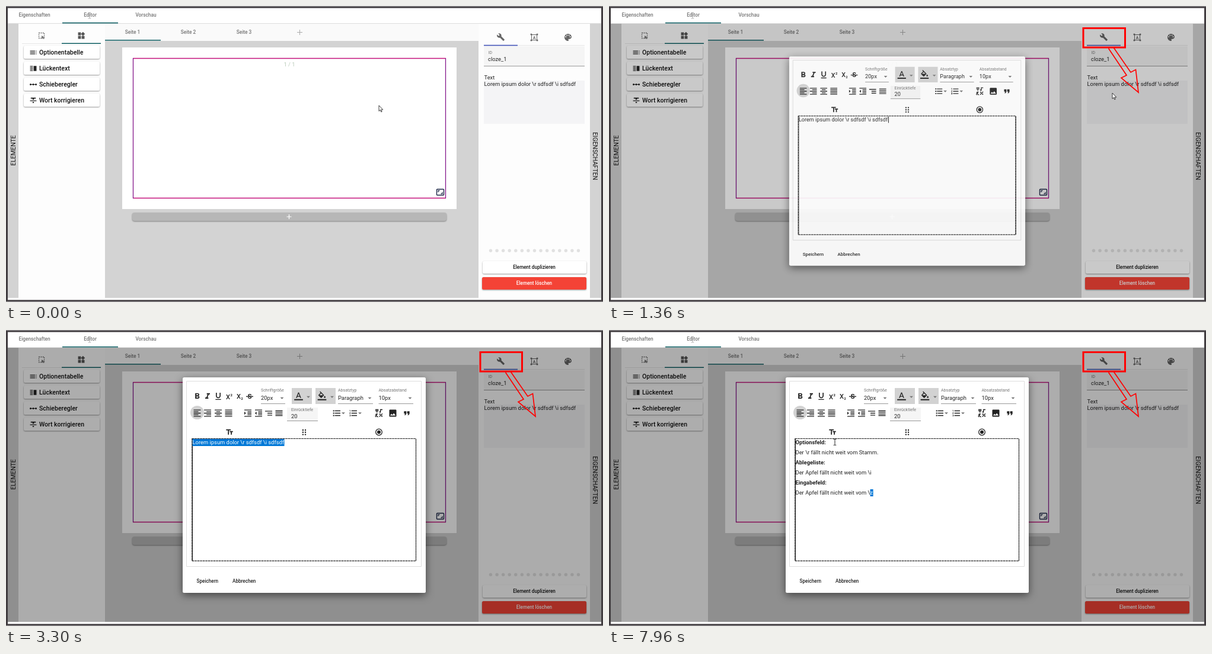
Animation, 1007 px wide and 500 px high, one loop 8000 ms. Source, as an HTML page:

```html
<!DOCTYPE html>
<html lang="de">
<head>
<meta charset="utf-8">
<title>Lückentext-Editor</title>
<style>
  html, body { margin: 0; height: 100%; overflow: hidden; background: #fff; }
  svg { display: block; font-family: Roboto, sans-serif; }
  .raised { filter: drop-shadow(0 1px 1px #0006); }
  #dialog { transform-origin: 503px 262px; }
  #panel { filter: drop-shadow(0 4px 7px #0008); }
</style>
</head>
<body>
<svg id="stage" width="1007" height="500" viewBox="0 0 1007 500"></svg>
<script>
const GREY = '#757575', DARK = '#222', TEAL = '#0b5c61', FONT = 9.4;

const rect = (x, y, w, h, fill, extra = '') =>
  `<rect x="${x}" y="${y}" width="${w}" height="${h}" fill="${fill}" ${extra}/>`;
const text = (x, y, str, size = FONT, extra = '') =>
  `<text x="${x}" y="${y}" font-size="${size}" ${extra}>${str}</text>`;
const label = (x, y, str, size, fill, weight = 500) =>
  text(x, y, str, size, `text-anchor="middle" font-weight="${weight}" fill="${fill}"`);
const icon = (d, x, y, size = 16, fill = DARK) =>
  `<path d="${d}" fill="${fill}" transform="translate(${x - size / 2} ${y - size / 2}) scale(${size / 24})"/>`;
const line = (d, stroke, width = 1, extra = '') =>
  `<path d="${d}" fill="none" stroke="${stroke}" stroke-width="${width}" ${extra}/>`;
const dot = (x, y, r, fill) => `<circle cx="${x}" cy="${y}" r="${r}" fill="${fill}"/>`;
const alignPath = (x, w) => [3, 7, 11, 15, 19].map((y, i) =>
  i % 2 ? `M${x} ${y}h${w}v2h${-w}z` : `M3 ${y}h18v2H3z`).join('');

const ICONS = {
  toc: 'M3 9h14V7H3zm0 4h14v-2H3zm0 4h14v-2H3zm16 0h2v-2h-2zm0-10v2h2V7zm0 6h2v-2h-2z',
  split: 'M3 15h8v-2H3zm0 4h8v-2H3zm0-8h8V9H3zm0-6v2h8V5zm10 0h8v14h-8z',
  scale: 'M4 11h16v2H4zM2 12a2.5 2.5 0 0 1 5 0 2.5 2.5 0 0 1-5 0zM9.5 12a2.5 2.5 0 0 1 5 0 2.5 2.5 0 0 1-5 0zM17 12a2.5 2.5 0 0 1 5 0 2.5 2.5 0 0 1-5 0z',
  strike: 'M10 19h4v-3h-4zM5 4v3h5v3h4V7h5V4zM3 14h18v-2H3z',
  widgets: 'M13 13v8h8v-8zM3 21h8v-8H3zM3 3v8h8V3zm13.66-1.31L11 7.34 16.66 13l5.66-5.66z',
  wrench: 'M22.7 19l-9.1-9.1c.9-2.3.4-5-1.5-6.9-2-2-5-2.4-7.4-1.3L9 6 6 9 1.6 4.7C.4 7.1.9 10.1 2.9 12.1c1.9 1.9 4.6 2.4 6.9 1.5l9.1 9.1c.4.4 1 .4 1.4 0l2.3-2.3c.5-.4.5-1.1.1-1.4z',
  palette: 'M12 3c-4.97 0-9 4.03-9 9s4.03 9 9 9c.83 0 1.5-.67 1.5-1.5 0-.39-.15-.74-.39-1.01-.23-.26-.38-.61-.38-.99 0-.83.67-1.5 1.5-1.5H16c2.76 0 5-2.24 5-5 0-4.42-4.03-8-9-8z',
  bold: 'M15.6 10.79c.97-.67 1.65-1.77 1.65-2.79 0-2.26-1.75-4-4-4H7v14h7.04c2.09 0 3.71-1.7 3.71-3.79 0-1.52-.86-2.82-2.15-3.42zM10 6.5h3c.83 0 1.5.67 1.5 1.5s-.67 1.5-1.5 1.5h-3zm3.5 9H10v-3h3.5c.83 0 1.5.67 1.5 1.5s-.67 1.5-1.5 1.5z',
  italic: 'M10 4v3h2.21l-3.42 8H6v3h8v-3h-2.21l3.42-8H18V4z',
  underline: 'M12 17c3.31 0 6-2.69 6-6V3h-2.5v8c0 1.93-1.57 3.5-3.5 3.5S8.5 12.93 8.5 11V3H6v8c0 3.31 2.69 6 6 6zm-7 2v2h14v-2z',
  color: 'M11 3L5.5 17h2.25l1.12-3h6.25l1.12 3h2.25L13 3zm-1.38 9L12 5.67 14.38 12zM1 20h22v3H1z',
  fill: 'M16.56 8.94L7.62 0 6.21 1.41l2.38 2.38-5.15 5.15c-.59.59-.59 1.54 0 2.12l5.5 5.5c.29.29.68.44 1.06.44s.77-.15 1.06-.44l5.5-5.5c.59-.58.59-1.53 0-2.12zM5.21 10L10 5.21 14.79 10zM19 11.5s-2 2.17-2 3.5a2 2 0 0 0 4 0c0-1.33-2-3.5-2-3.5zM1 20h22v3H1z',
  left: alignPath(3, 12), right: alignPath(9, 12), center: alignPath(7, 10), justify: alignPath(3, 18),
  indent: 'M3 21h18v-2H3zM3 8v8l4-4zm8 9h10v-2H11zM3 3v2h18V3zm8 6h10V7H11zm0 4h10v-2H11z',
  outdent: 'M3 21h18v-2H3zM7 8v8l-4-4zm4 9h10v-2H11zM3 3v2h18V3zm8 6h10V7H11zm0 4h10v-2H11z',
  segment: 'M9 18h12v-2H9zM3 6v2h18V6zm6 7h12v-2H9z',
  reorder: 'M3 15h18v-2H3zm0 4h18v-2H3zm0-8h18V9H3zm0-6v2h18V5z',
  bullets: 'M2.5 4.5h3v3h-3zm0 6h3v3h-3zm0 6h3v3h-3zM7 5v2h14V5zm0 6v2h14v-2zm0 6v2h14v-2z',
  numbers: 'M2 17h2v.5H3v1h1v.5H2v1h3v-4H2zm1-9h1V4H2v1h1zm-1 3h1.8L2 13.1v.9h3v-1H3.2L5 10.9V10H2zm5-6v2h14V5zm0 14h14v-2H7zm0-6h14v-2H7z',
  symbols: 'M3 2h8v2H3zM3 5h8v2H8v4H6V7H3zM12.4 20.2l7.8-7.8 1.4 1.4-7.8 7.8zM13 13h3v3h-3zM18 18h3v3h-3zM15 2h6v2h-4v5a2 2 0 1 1-2-2zM5 13h4v2L6 17l5 5H8l-3-3-1 1 2 2H4l-2-2 2-3-1-2z',
  image: 'M21 19V5c0-1.1-.9-2-2-2H5c-1.1 0-2 .9-2 2v14c0 1.1.9 2 2 2h14c1.1 0 2-.9 2-2zM8.5 13.5l2.5 3.01L14.5 12l4.5 6H5z',
  quote: 'M6 17h3l2-4V7H5v6h3zm8 0h3l2-4V7h-6v6h3z',
  textSize: 'M2.5 4v3h5v12h3V7h5V4zm19 5h-9v3h3v7h3v-7h3V9z',
  caret: 'M7 10l5 5 5-5z'
};

const row = (names, xs, y) => names.split(' ').map((n, i) => icon(ICONS[n], xs[i], y)).join('');

function leftPanel() {
  const items = [['toc', 'Optionentabelle'], ['split', 'Lückentext'], ['scale', 'Schieberegler'], ['strike', 'Wort korrigieren']];
  return rect(21, 30, 146, 463, '#fdfdfd') + line('M27 63.5H160', '#e6e6e6') + rect(94, 62.5, 66, 1.5, TEAL) +
    line('M55.5 45.5h9v9h-9z', GREY, 1.3, 'stroke-dasharray="2 1.2"') + icon('M12 12v9l3-3 3 4 2-1-3-4h4z', 60, 50, 14, GREY) +
    icon(ICONS.widgets, 127, 50, 14.5, '#555') +
    items.map(([name, str], i) => {
      const y = 67 + 27 * i;
      return rect(30, y, 128, 22, '#fff', 'rx="2.5" class="raised"') + icon(ICONS[name], 46, y + 11.5, 14.5) +
        text(56, y + 14.6, str, 10.5, 'font-weight="500" fill="#111"');
    }).join('');
}

function pageArea() {
  return rect(167, 30, 630, 29, '#fafafa') + rect(167, 57, 94, 1.5, TEAL) +
    [1, 2, 3].map(n => label(119.5 + 94 * n, 47, 'Seite ' + n, 8.3, GREY)).join('') +
    line('M491 44.5h9M495.5 40v9', '#aaa') +
    rect(196, 70, 564, 273, '#fff') +
    line('M214 88.5H742M214 324.5H742', '#c4127c', 1.3) + line('M214.5 88V325M741.5 88V325', '#84168a', 1.3) +
    label(478, 101.5, '1 / 1', FONT, '#b9cbb9', 400) +
    line('M727.5 309.5h10a1 1 0 0 1 1 1v8a1 1 0 0 1-1 1h-10a1 1 0 0 1-1-1v-8a1 1 0 0 1 1-1z', '#1b2546', 1.4) +
    line('M729 314.5v-2.6h2.6M736 314.5v2.6h-2.6', '#1b2546', 1.3) +
    rect(213, 349, 530, 14, '#b7b7b7', 'rx="4" class="raised"') + line('M473.5 356h8M477.5 352v8', '#fff', 1.2);
}

function rightPanel() {
  const dots = Array.from({ length: 15 }, (_, i) => dot(817.5 + 10.57 * i, 413.3, 2.7, '#e1e1e1')).join('');
  const holes = [[944.2, 52], [946.3, 49.4], [949.6, 49.4], [951.6, 52]].map(([x, y]) => dot(x, y, 1, '#fdfdfd')).join('');
  return rect(797, 30, 188, 463, '#fdfdfd') + line('M806 66.5H976', '#e6e6e6') + rect(806, 65.7, 57, 1.6, '#3f51b5') +
    icon(ICONS.wrench, 834.5, 52.5, 14, '#666') + icon(ICONS.palette, 948, 53, 16, '#666') + holes +
    line('M886.5 48.5h9v9h-9z', '#666') + label(891, 56, 'A', 7, '#666', 700) +
    [[886, 48], [896, 48], [886, 58], [896, 58]].map(([x, y]) => rect(x - 1.3, y - 1.3, 2.6, 2.6, '#666')).join('') +
    rect(806, 68, 170, 34, '#f5f5f5') + line('M806 101.5H976', '#999') +
    text(813.5, 81, 'ID', 7, `fill="${GREY}"`) + text(813, 92.7, 'cloze_1') + text(806.5, 124, 'Text') +
    rect(806, 126, 170, 73, '#f4f4f6') + text(806.5, 135, 'Lorem ipsum dolor \\r sdfsdf \\i sdfsdf') + dots +
    rect(804, 431, 175, 21, '#fff', 'rx="2.5" class="raised"') + label(891, 444.3, 'Element duplizieren', 8.15, '#111') +
    rect(803, 458, 176, 21, '#f44336', 'rx="2.5" class="raised"') + label(891, 471.2, 'Element löschen', 8.15, '#fff');
}

function toolbar() {
  const select = (x, end, name, value) => text(x, 104, name, 7.05, `fill="${GREY}"`) + text(x, 118.3, value) +
    line(`M${x} 124.5H${end}`, '#999') + icon(ICONS.caret, end - 5.5, 115, 14, GREY);
  return row('bold italic underline', [322.5, 340, 358], 112) +
    text(371, 116.5, 'X', 11, 'font-weight="500"') + text(378.5, 112, '2', 6, 'font-weight="700"') +
    text(389, 116, 'X', 11, 'font-weight="500"') + text(396.5, 118, '2', 5.5, 'font-weight="700"') +
    label(411, 116.3, 'S', 11.5, DARK, 700) + line('M405 112.3h12', DARK, 1.3) +
    select(430, 471, 'Schriftgröße', '20px') + select(560, 619, 'Absatztyp', 'Paragraph') + select(628.5, 687, 'Absatzabstand', '10px') +
    rect(482, 98, 34, 27, '#d2d2d2') + rect(522, 98, 34, 27, '#d2d2d2') + row('color fill', [493.5, 533], 111.5) +
    [[510, 113], [550, 113], [569, 140.5], [597, 140.5]].map(([x, y]) => icon(ICONS.caret, x, y, 14, GREY)).join('') +
    dot(322.5, 139.5, 11.5, '#d2d2d2') +
    row('left right center justify indent outdent segment reorder', [322.5, 340, 358, 375.5, 408, 426, 443, 460.5], 140.5) +
    rect(474, 131, 52, 23, '#f5f5f5') + line('M474 153.5h52', '#999') +
    text(481, 137, 'Einrücktiefe', 7.05, `fill="${GREY}"`) + text(481, 148.8, '20') +
    row('bullets numbers symbols image quote', [558, 586, 629, 652.5, 676], 140.5) +
    icon(ICONS.textSize, 377, 172.5, 14.5) +
    [500.9, 505].map(x => [169, 172.8, 176.6].map(y => dot(x, y, 1.2, DARK)).join('')).join('') +
    dot(629, 172.5, 3, DARK) + '<circle cx="629" cy="172.5" r="5.3" fill="none" stroke="#222" stroke-width="1.3"/>';
}

const STORY = ['Optionsfeld:', 'Der \\r fällt nicht weit vom Stamm.', 'Ablegeliste:', 'Der Apfel fällt nicht weit vom \\i',
  'Eingabefeld:', 'Der Apfel fällt nicht weit vom \\z'];

const dialog = () => '<g id="dialog">' + rect(298, 80, 410, 364, '#fff', 'rx="2.5" id="panel"') +
  line('M304.5 86.5H700.5V399.5H304.5z', '#ddd') + toolbar() +
  line('M313.5 183.5H691.5V390H313.5z', '#888') +
  line('M314 183.5H691.5V390H314z', DARK, 1.1, 'stroke-dasharray="3 1.5"') + line('M314.5 184V390M691.5 184V390', DARK) +
  '<g id="doc">' + text(314.5, 193.3, 'Lorem ipsum dolor \\r sdfsdf \\i sdfsdf', FONT, 'id="lorem"') + '<g id="story">' +
  STORY.map((s, i) => text(314.5, 193.3 + 17 * i, s, FONT, i % 2 ? '' : 'font-weight="700"')).join('') + '</g></g>' +
  '<g clip-path="url(#selected)">' + rect(314, 183, 378, 207, '#0078d7') + '<use href="#doc" fill="#fff"/></g>' +
  rect(0, 0, 1, 11, '#111', 'id="textCaret"') +
  label(339.8, 426.5, 'Speichern', 8.15, DARK) + label(401.7, 426.5, 'Abbrechen', 8.15, DARK) + '</g>';

const vertical = (x, y, angle, str) =>
  `<g transform="translate(${x} ${y}) rotate(${angle})">${label(0, 3.7, str, 10.3, '#111', 400)}</g>`;
const iBeam = 'M-2.2 -5H-.5L0 -4.5L.5 -5H2.2M0 -4.5V4.5M-2.2 5H-.5L0 4.5L.5 5H2.2';

stage.innerHTML = `<clipPath id="selected">${rect(0, 0, 0, 12, '#000', 'id="selection"')}</clipPath>` +
  `<g fill="${DARK}">` + rect(0, 0, 1007, 500, '#fff') +
  ['Eigenschaften', 'Editor', 'Vorschau'].map((s, i) => label(48 + 94 * i, 18, s, 8.3, GREY)).join('') +
  line(iBeam, '#aaa', 1, 'transform="translate(141 16)"') +
  line('M3 29.5H1004', '#ddd') + rect(95, 27.8, 94, 1.6, TEAL) +
  rect(3, 30, 1001, 463, '#d3d3d3') + leftPanel() + pageArea() + rightPanel() +
  vertical(12, 244, -90, 'ELEMENTE') + vertical(994, 253.5, 90, 'EIGENSCHAFTEN') +
  rect(3, 30, 1001, 463, '#000', 'id="backdrop"') + dialog() +
  '<g id="note">' + line('M800 37.5h70.5v32.5H800z', '#f00', 3) +
  line('M842.5 71.5L873 117L864 121.5L893 146L888.5 107.5L880 112L851 70', '#f00', 1.7) + '</g>' +
  line('M1.5 2H1005.5V498H1.5z', '#413d40', 3) +
  '<g id="mouse"><path id="arrow" d="M0 0v9.6l2.2-2 1.6 3.4 1.4-.6-1.5-3.3h3.1z" fill="#fff" stroke="#111" stroke-width=".8"/>' +
  line(iBeam, DARK, 1, 'id="beam"') + '</g></g>';

const MOUSE = [[0, 629, 168], [130, 629, 168], [330, 720, 190], [550, 830, 175], [730, 849, 147], [1400, 849, 147],
  [1700, 466, 203], [1900, 330, 195], [2000, 316, 189.5], [2530, 316, 189.5], [3030, 486, 197], [4030, 486, 197],
  [4100, 502, 240], [4330, 502, 240], [4830, 367.5, 222], [5100, 344, 215], [5300, 338, 207], [5790, 338, 207],
  [5860, 409.5, 237], [6150, 441, 241], [6630, 441, 241], [6930, 443, 277], [7330, 443, 277], [7400, 457, 287],
  [7660, 457, 287], [7960, 381, 189.5], [8000, 381, 189.5]];
// start, end, x, text row
const CARETS = [[1221, 2260, 470, 0], [2260, 2530, 314.5, 0], [4030, 5430, 445.5, 5], [5430, 5630, 337, 1],
  [6450, 6600, 441, 3], [7130, 7330, 441, 5]];
// start, end, x, width, text row
const SELECTIONS = [[2530, 4030, 314.5, 155, 0], [5630, 6450, 335, 5.6, 1], [6600, 7130, 440.6, 2.5, 3], [7330, 8000, 440.6, 5, 5]];

const clamp = v => Math.min(1, Math.max(0, v));
const during = t => ([start, end]) => t >= start && t < end;
const show = (el, on) => el.setAttribute('display', on ? 'inline' : 'none');
const setAll = (el, attrs) => Object.entries(attrs).forEach(([k, v]) => el.setAttribute(k, v));
const $ = id => document.getElementById(id);

function bezier(x, x1, y1, x2, y2) {
  const at = (s, a, b) => 3 * s * (1 - s) * ((1 - s) * a + s * b) + s ** 3;
  let lo = 0, hi = 1;
  for (let i = 0; i < 20; i++) {
    const mid = (lo + hi) / 2;
    if (at(mid, x1, x2) < x) lo = mid; else hi = mid;
  }
  return at(hi, y1, y2);
}

function mouseAt(t) {
  const i = Math.max(1, MOUSE.findIndex(k => k[0] > t));
  const [t0, x0, y0] = MOUSE[i - 1], [t1, x1, y1] = MOUSE[i];
  const p = (t - t0) / (t1 - t0);
  return [x0 + (x1 - x0) * p, y0 + (y1 - y0) * p];
}

function draw(t) {
  const opening = bezier(clamp((t - 1221) / 232), 0, 0, .2, 1);
  show($('dialog'), t >= 1221);
  $('dialog').style.opacity = opening;
  $('dialog').style.transform = `scale(${.7 + .3 * opening})`;
  setAll($('backdrop'), { opacity: .32 * bezier(clamp((t - 1221) / 620), .25, .8, .25, 1) });
  setAll($('note'), { opacity: clamp((t - 130) / 400) });

  show($('lorem'), t < 4030);
  show($('story'), t >= 4030);

  const [x, y] = mouseAt(t);
  const inEditor = t > 1400 && x > 314 && x < 692 && y > 183 && y < 390;
  setAll($('mouse'), { transform: `translate(${x} ${y})` });
  show($('mouse'), t < 3300 || t >= 4060);
  show($('arrow'), !inEditor);
  show($('beam'), inEditor);

  const caret = CARETS.find(during(t));
  show($('textCaret'), caret && Math.floor((t - caret[0]) / 500) % 2 === 0);
  if (caret) setAll($('textCaret'), { x: caret[2], y: 184.5 + 17 * caret[3] });

  const sel = SELECTIONS.find(during(t));
  const width = !sel ? 0 : sel[4] ? sel[3] : Math.min(sel[3], Math.max(0, x - sel[2] - 1.5));
  setAll($('selection'), { width, x: sel ? sel[2] : 0, y: sel ? 184 + 17 * sel[4] : 0 });
}

function tick() {
  draw(performance.now() % 8000);
  requestAnimationFrame(tick);
}
tick();
</script>
</body>
</html>
```
